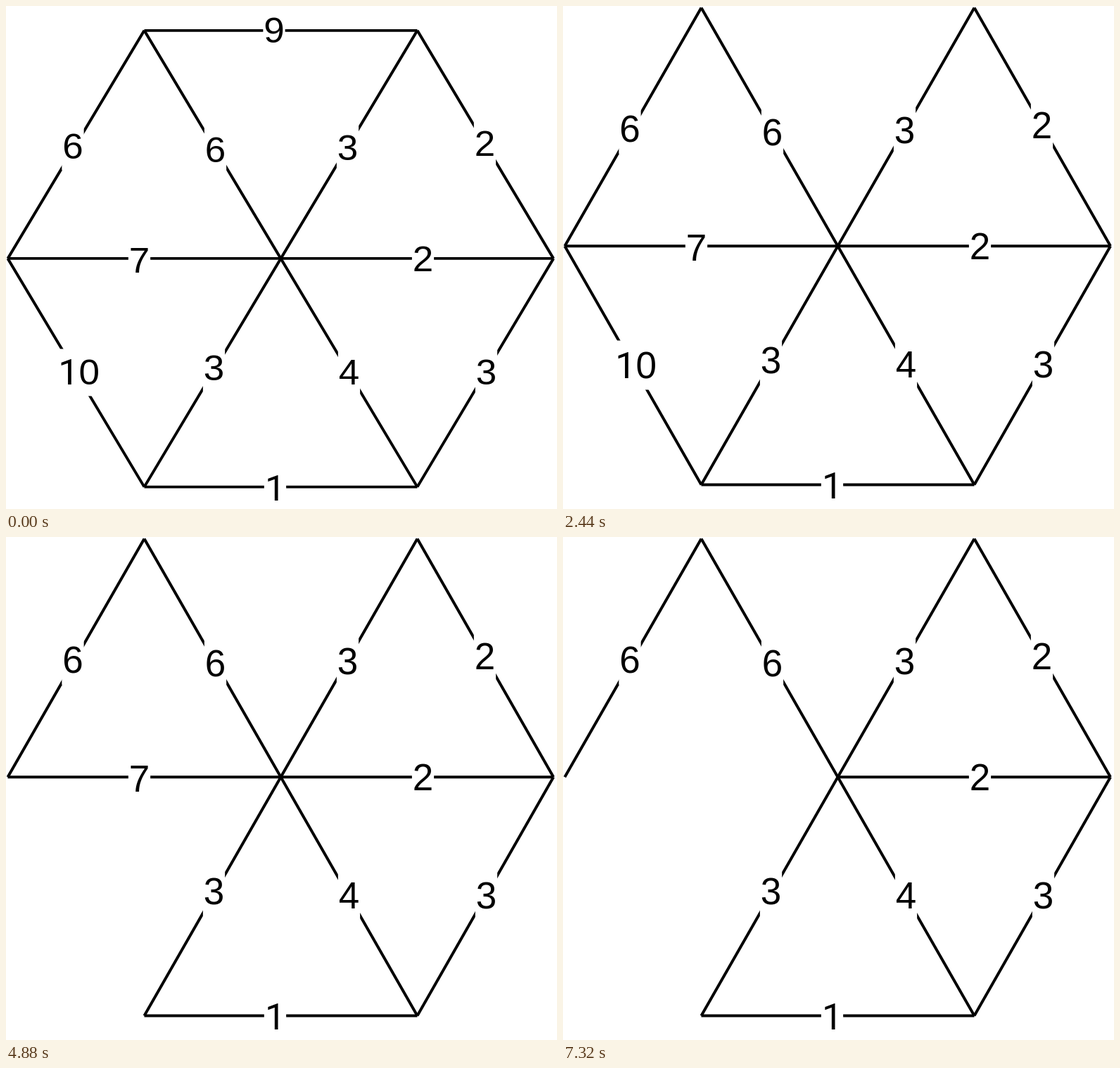
An HTML page with a canvas for the animation above (8 s loop, 783 by 715 pixels).

```html
<!DOCTYPE html>
<html lang="en">
<head>
<meta charset="utf-8">
<style>
  html, body { margin: 0; width: 100%; height: 100%; overflow: hidden; background: #fff; }
  canvas { display: block; }
</style>
</head>
<body>
<canvas id="stage" width="783" height="715"></canvas>
<script>
const ctx = document.getElementById('stage').getContext('2d');
const LOOP = 8000, STEP = 1220;

const nodes = {
  topLeft: [196.5, 2.5], topRight: [584.5, 2.5],
  left: [2.5, 341.2], center: [390.5, 341.2], right: [778, 341.2],
  bottomLeft: [196.5, 680.5], bottomRight: [584.5, 680.5]
};

// Edge: start, end, weight, label centre
const edges = [
  ['topLeft', 'topRight', '9', 381, 2.5],
  ['left', 'bottomLeft', '10', 103.5, 510.5],
  ['left', 'center', '7', 189.5, 344],
  ['topLeft', 'left', '6', 95, 175],
  ['topLeft', 'center', '6', 297.5, 179.5],
  ['topRight', 'center', '3', 485.5, 177],
  ['topRight', 'right', '2', 680.5, 170],
  ['center', 'right', '2', 592.5, 342],
  ['center', 'bottomLeft', '3', 295.5, 504],
  ['center', 'bottomRight', '4', 487.5, 510],
  ['right', 'bottomRight', '3', 682.5, 510],
  ['bottomLeft', 'bottomRight', '1', 382.5, 682]
];

function drawLine([from, to], marked) {
  ctx.strokeStyle = marked ? '#f00' : '#000';
  ctx.lineWidth = marked ? 11 : 4;
  ctx.beginPath();
  ctx.moveTo(...nodes[from]);
  ctx.lineTo(...nodes[to]);
  ctx.stroke();
}

function drawLabel([, , text, x, y], marked) {
  const advance = 29.3, width = text.length * advance + 2;
  ctx.fillStyle = '#fff';
  ctx.fillRect(x - width / 2, y - 35, width, 70);
  ctx.fillStyle = marked ? '#f00' : '#000';
  [...text].forEach((digit, i) => {
    // Roboto has a 1 without a foot
    const face = digit === '1' ? '52px Roboto' : '53px "Liberation Sans"';
    ctx.font = `${marked ? 'bold ' : ''}${face}, Arial, sans-serif`;
    ctx.fillText(digit, x + (i - (text.length - 1) / 2) * advance, y + 18.3);
  });
}

function draw(time) {
  const step = Math.floor((time % LOOP) / STEP);
  const removed = step >> 1;
  const marked = step % 2 ? edges[removed] : null;
  const visible = edges.slice(removed);

  ctx.setTransform(1, 0, 0, 1, 0, 0);
  ctx.fillStyle = '#fff';
  ctx.fillRect(0, 0, 783, 715);

  // The picture is fitted to the stage around its outermost parts
  if (removed === 0) ctx.setTransform(1, 0, 0, 0.957, 0, 32.4);
  else if (marked) ctx.setTransform(0.9965, 0, 0, 1, 4.2, 0);

  ctx.textAlign = 'center';
  ctx.textBaseline = 'alphabetic';
  if (marked) drawLine(marked, true);
  visible.forEach(edge => edge !== marked && drawLine(edge, false));
  visible.forEach(edge => drawLabel(edge, edge === marked));
}

function tick() {
  draw(performance.now());
  requestAnimationFrame(tick);
}
tick();
</script>
</body>
</html>
```
